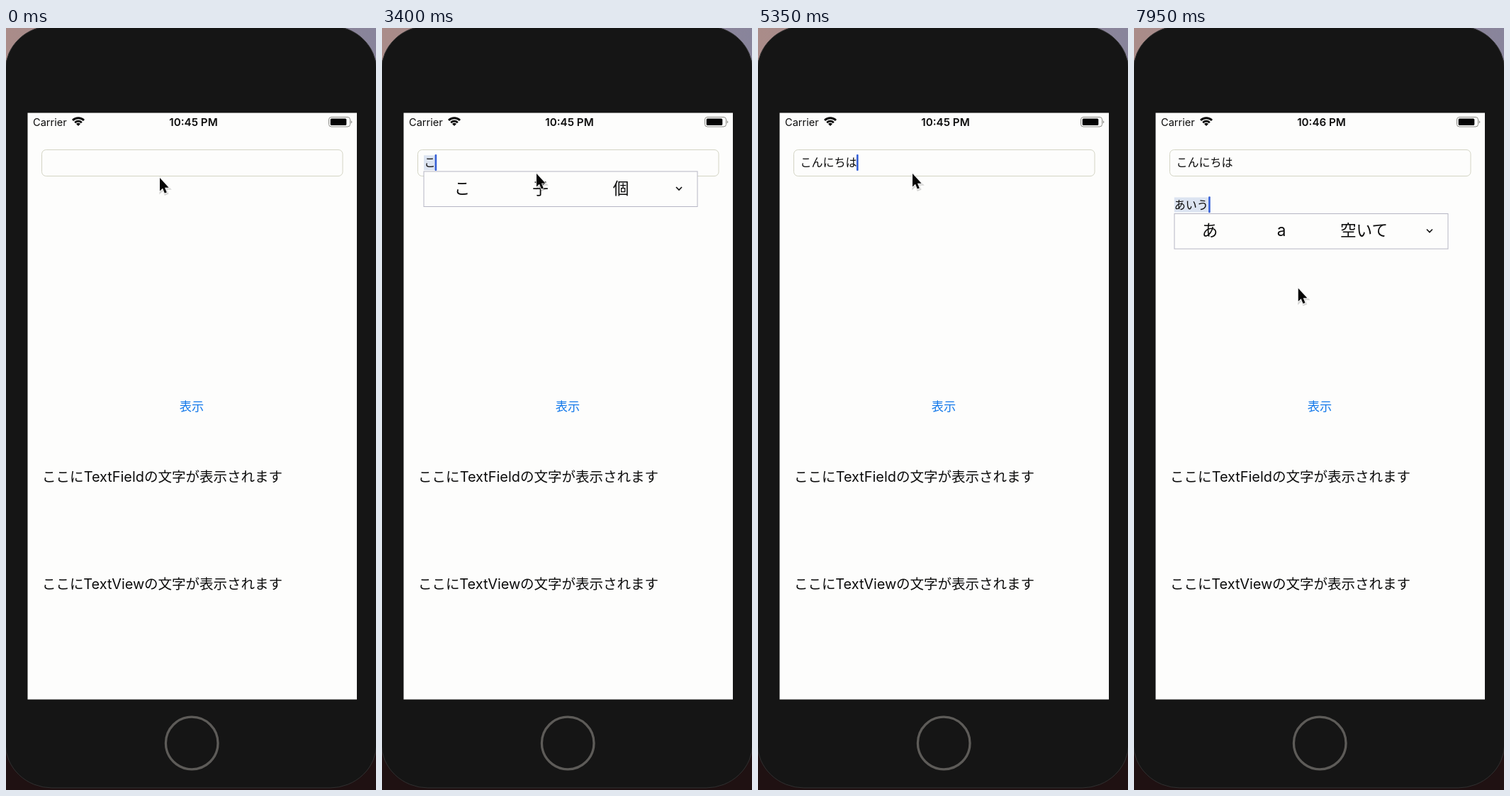
An HTML page that plays this animation: 522x1073 px, repeating every 8000 ms.

```html
<!DOCTYPE html>
<html lang="ja">
<head>
<meta charset="utf-8">
<style>
  html, body { margin: 0; width: 100%; height: 100%; overflow: hidden; background: #151515; }
  svg { display: block; width: 100vw; height: 100vh; }
  text { font-family: "Noto Sans CJK JP", "Noto Sans CJK", sans-serif; fill: #0c0c0c; white-space: pre; }
  .latin { font-family: Inter, sans-serif; }
  .label { font-size: 19.5px; }
  .label .latin { font-size: 19.9px; }
  .input { font-size: 16px; }
  .choice { font-size: 22.6px; text-anchor: middle; }
</style>
</head>
<body>
<svg viewBox="0 0 522 1073">
  <defs>
    <linearGradient id="desk" x2="1">
      <stop offset="0" stop-color="#aa8c89"/>
      <stop offset="1" stop-color="#88849b"/>
    </linearGradient>
    <path id="arrow" d="M0 0V18.5L4 14.8 6.8 21.6 9.8 20.4 7 13.8H12.6Z"/>
  </defs>
  <rect width="522" height="100" fill="url(#desk)"/>
  <rect y="973" width="522" height="100" fill="#1f1112"/>
  <rect x="-1" y="-3" width="524" height="1073" rx="66" ry="63" fill="#151515" stroke="#303030"/>
  <rect x="30.5" y="119.5" width="464.5" height="826" fill="#fdfdfc"/>
  <circle cx="262.2" cy="1007" r="36.8" fill="none" stroke="#5d5b58" stroke-width="3.3"/>

  <text class="latin" x="38" y="137.5" font-size="14.6">Carrier</text>
  <g id="wifi" fill="none" stroke="#080808"></g>
  <text class="latin" id="clock" x="264.5" y="137.7" font-size="15.2" font-weight="600" text-anchor="middle"></text>
  <rect x="455.5" y="125.5" width="30" height="13.5" rx="3.5" fill="none" stroke="#8b8b86"/>
  <rect x="457.7" y="127.6" width="22.6" height="9.3" rx="1.5" fill="#050505"/>
  <path d="M486.8 130q3 2.3 0 4.6z" fill="#8b8b86"/>

  <rect x="50.5" y="171.5" width="424.5" height="37" rx="6" fill="#fdfdfc" stroke="#d3d4c4"/>
  <text x="262" y="538.7" font-size="17.2" text-anchor="middle" style="fill:#1479ea">表示</text>
  <g id="labels"></g>

  <rect id="mark" height="21" fill="#dce4f1"/>
  <text class="input" id="fieldText" x="59.6" y="195.3"></text>
  <text class="input" id="viewText" x="56.7" y="254.7"></text>
  <g id="popup">
    <rect x=".5" y=".5" width="386" height="49.5" fill="#fdfdfc" stroke="#b6b6c4"/>
    <text class="choice" y="32"></text>
    <text class="choice" y="32"></text>
    <text class="choice" y="32"></text>
    <path d="M356.5 22.5l4 4 4-4" fill="none" stroke="#111" stroke-width="1.6"/>
  </g>
  <rect id="caret" width="2.6" height="23" rx="1" fill="#355fd6"/>
  <g id="pointer">
    <use href="#arrow" transform="translate(.8 1.5)" fill="none" stroke="#000" stroke-opacity=".15" stroke-width="3"/>
    <use href="#arrow" fill="#050505" stroke="#fff" stroke-width="1.6" paint-order="stroke"/>
  </g>
</svg>
<script>
const LOOP = 8000;
const FIELD_FOCUS = 800, FIELD_COMMIT = 5150, VIEW_FOCUS = 6050;
const $ = id => document.getElementById(id);
const set = (el, attrs) => Object.entries(attrs).forEach(([k, v]) => el.setAttribute(k, v));
const clamp = v => Math.max(0, Math.min(1, v));
const smooth = v => { v = clamp(v); return v * v * (3 - 2 * v); };
const latest = (steps, t) => steps.filter(s => s[0] <= t).pop();

// [time, value]
const fieldSteps = [
  [0, ''], [3150, 'ｋ'], [3300, 'こ'], [3550, 'こｎ'], [3700, 'こん'], [4150, 'こんｎ'],
  [4300, 'こんに'], [4500, 'こんにｃ'], [4650, 'こんにち'], [4800, 'こんにちｈ'], [4900, 'こんにちは']
];
const viewSteps = [[0, ''], [7450, 'あ'], [7650, 'あい'], [7850, 'あいう']];
const choiceSteps = [
  [0, null], [3400, ['こ', '子', '個']], [3800, ['こん', '今回', '今後']],
  [4400, ['こんに', '今日', '今回']], [4950, ['こんにちは', '今日は', '今日']],
  [FIELD_COMMIT, null], [7600, ['あ', 'a', '空いて']]
];

// [start, end, x, y]
const pointerMoves = [[150, 500, 218, 205], [5450, 5950, 231.7, 366.5]];

const fan = (r, w) => {
  const d = r * Math.SQRT1_2;
  return `<path d="M${102 - d} ${138 - d}A${r} ${r} 0 0 1 ${102 + d} ${138 - d}" stroke-width="${w}"/>`;
};
$('wifi').innerHTML = fan(11.3, 2.9) + fan(6.8, 2.7) + fan(2.1, 4.2);

$('labels').innerHTML = [['TextField', 639], ['TextView', 789.5]].map(([name, y]) =>
  `<g class="label"><text x="51" y="${y}">ここに</text>` +
  `<text class="latin" x="152.3" y="${y}" text-anchor="middle">${name}</text>` +
  `<text x="195" y="${y}">の文字が表示されます</text></g>`).join('');

function blink(age) {
  const phase = age % 1000;
  return phase < 650 ? 1 : phase < 750 ? (750 - phase) / 100 : phase < 900 ? 0 : (phase - 900) / 100;
}

function drawPopup(choices, inView) {
  const popup = $('popup');
  popup.style.display = choices ? '' : 'none';
  if (!choices) return;
  set(popup, { transform: inView ? 'translate(56.5 261)' : 'translate(58.5 201.5)' });
  const centers = inView ? [50.5, 151.5, 268] : [54.5, 165, 278.5];
  popup.querySelectorAll('text').forEach((el, i) => {
    el.textContent = choices[i];
    set(el, { x: centers[i] });
    el.classList.toggle('latin', choices[i] === 'a');
  });
}

function draw(t) {
  const inView = t >= VIEW_FOCUS;
  const fieldText = latest(fieldSteps, t)[1], viewText = latest(viewSteps, t)[1];
  const text = inView ? viewText : fieldText;
  const composing = text && (inView || t < FIELD_COMMIT);
  const width = text.length * 16.1;
  const left = inView ? 56.8 : 59;
  const top = inView ? 237.2 : 178;

  $('clock').textContent = t < 5800 ? '10:45 PM' : '10:46 PM';
  $('fieldText').textContent = fieldText;
  $('viewText').textContent = viewText;

  set($('mark'), { x: left, y: top + 1.3, width: composing ? width : 0 });

  const focusTime = inView ? VIEW_FOCUS : text ? FIELD_COMMIT : FIELD_FOCUS;
  set($('caret'), {
    x: inView && !text ? 55.2 : left + width - (text && !inView ? .5 : 0),
    y: top,
    opacity: t < FIELD_FOCUS ? 0 : composing ? 1 : blink(t - focusTime)
  });
  drawPopup(latest(choiceSteps, t)[1], inView);

  let x = 217, y = 211;
  for (const [start, end, toX, toY] of pointerMoves) {
    const p = smooth((t - start) / (end - start));
    x += (toX - x) * p;
    y += (toY - y) * p;
  }
  set($('pointer'), { transform: `translate(${x} ${y})` });
}

function tick() {
  draw(performance.now() % LOOP);
  requestAnimationFrame(tick);
}
tick();
</script>
</body>
</html>
```
